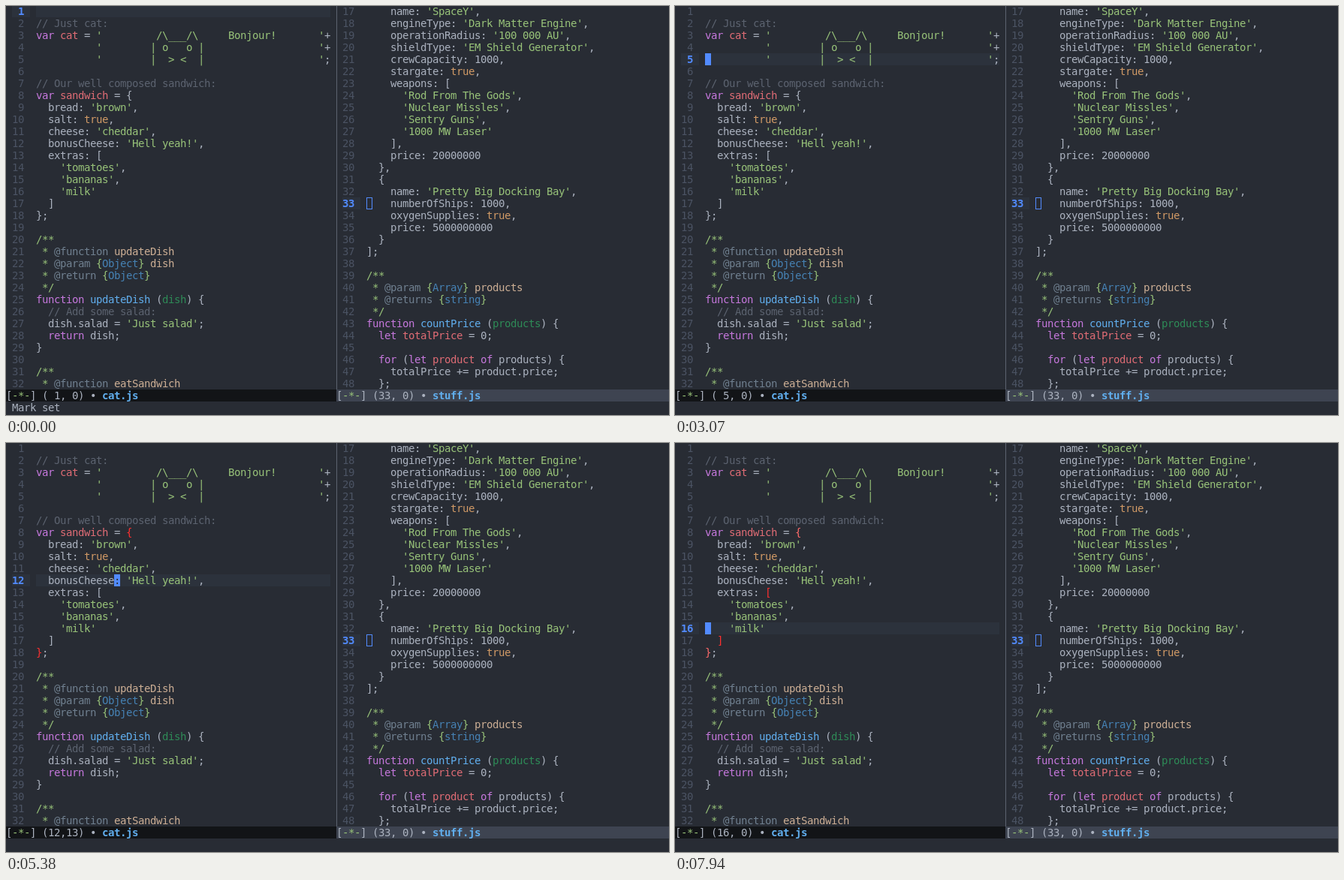
Write an HTML page with a canvas that moves like this. It is 883 px wide and 545 px high and loops after 8 s.

```html
<!DOCTYPE html>
<html lang="en">
<head>
<meta charset="utf-8">
<title>Editor</title>
<style>
  html, body { margin: 0; width: 100%; height: 100%; overflow: hidden; background: #282c34; }
  canvas { display: block; }
</style>
</head>
<body>
<canvas width="883" height="545"></canvas>
<script>
const ctx = document.querySelector('canvas').getContext('2d');
const CELL = 8, ROW = 16, ASCENT = 13, TOP = -1, LOOP = 8000;

const color = {
  bg: '#282c34', text: '#abb2bf', line: '#2c323c', region: '#3e4451', cursor: '#528bff',
  gutter: '#4b5363', border: '#5c6370', active: '#121417', inactive: '#3e4451',
  comment: '#5c6370', string: '#98c379', keyword: '#c678dd', constant: '#d19a66',
  variable: '#e06c75', func: '#61afef', param: '#2e8b57',
  tag: '#708090', type: '#4682b4', value: '#cdaf95',
  inner: '#ff3030', outer: '#ff6a6a'
};

const catCode = String.raw`
// Just cat:
var cat = '         /\___/\     Bonjour!       '+
          '        | o   o |                   '+
          '        |  > <  |                   ';

// Our well composed sandwich:
var sandwich = {
  bread: 'brown',
  salt: true,
  cheese: 'cheddar',
  bonusCheese: 'Hell yeah!',
  extras: [
    'tomatoes',
    'bananas',
    'milk'
  ]
};

/**
 * @function updateDish
 * @param {Object} dish
 * @return {Object}
 */
function updateDish (dish) {
  // Add some salad:
  dish.salad = 'Just salad';
  return dish;
}

/**
 * @function eatSandwich`;

const stuffCode = `    name: 'SpaceY',
    engineType: 'Dark Matter Engine',
    operationRadius: '100 000 AU',
    shieldType: 'EM Shield Generator',
    crewCapacity: 1000,
    stargate: true,
    weapons: [
      'Rod From The Gods',
      'Nuclear Missles',
      'Sentry Guns',
      '1000 MW Laser'
    ],
    price: 20000000
  },
  {
    name: 'Pretty Big Docking Bay',
    numberOfShips: 1000,
    oxygenSupplies: true,
    price: 5000000000
  }
];

/**
 * @param {Array} products
 * @returns {string}
 */
function countPrice (products) {
  let totalPrice = 0;

  for (let product of products) {
    totalPrice += product.price;
  };`;

const rules = new RegExp([
  String.raw`(?<comment>\/\/.*)`,
  String.raw`(?<string>'[^']*')`,
  String.raw`(?<tag>@\w+)`,
  String.raw`(?<type>(?<=\{)\w+(?=\}))`,
  String.raw`(?<value>(?<=@.* )\w+$)`,
  String.raw`(?<keyword>\b(?:var|let|function|for|of|return)\b)`,
  String.raw`(?<constant>\btrue\b)`,
  String.raw`(?<variable>(?<=\b(?:var|let) )\w+)`,
  String.raw`(?<func>(?<=function )\w+)`,
  String.raw`(?<param>(?<=function \w+ \()\w+)`
].join('|'), 'g');

// Each line becomes a list of [character, color] cells.
function highlight(line) {
  const base = /^(\/\*\*| \*)/.test(line) ? color.string : color.text;
  const cells = [...line].map(ch => [ch, base]);
  for (const m of line.matchAll(rules)) {
    const kind = Object.keys(m.groups).find(k => m.groups[k]);
    for (let i = 0; i < m[0].length; i++) cells[m.index + i][1] = color[kind];
  }
  return cells;
}

const parse = code => code.split('\n').map(highlight);
const left = { x: 0, first: 1, name: 'cat.js', lines: parse(catCode) };
const right = { x: 440, first: 17, name: 'stuff.js', lines: parse(stuffCode) };

// Editing commands: time, point, and optional mark column, message or hidden cursor.
const steps = [];
const step = (at, line, col, extra) => steps.push({ at, line, col, ...extra });
const walk = (start, end, from, to) => {
  for (let n = from; n <= to; n++) step(start + (end - start) * (n - from) / (to - from), n, 0);
};
const msg = 'Mark set';

step(0, 1, 0, { msg, hidden: true });
step(500, 1, 0, { msg });
step(980, 1, 0, { msg, hidden: true });
step(1210, 2, 0);
step(1430, 3, 0);
step(1660, 3, 0, { msg });
step(1930, 3, 49, { mark: 0 });
step(2350, 3, 49);
walk(2800, 3740, 3, 10);
step(4130, 10, 2);
step(4400, 10, 2, { msg });
step(4590, 10, 13, { mark: 2 });
step(4790, 10, 13);
step(5210, 11, 13);
step(5380, 12, 13);
step(5530, 13, 11);
step(5620, 13, 0);
step(5890, 12, 0);
step(6130, 12, 2);
step(6450, 12, 2, { msg });
step(6660, 12, 28, { mark: 2 });
step(7080, 12, 28);
walk(7350, 7820, 12, 16);

function rect(x, y, w, h, fill) {
  ctx.fillStyle = fill;
  ctx.fillRect(x, y, w, h);
}

function put(str, x, y, fill, bold) {
  ctx.font = (bold ? 'bold ' : '') + '14px "DejaVu Sans Mono", monospace';
  ctx.fillStyle = fill;
  [...str].forEach((ch, i) => ch !== ' ' && ctx.fillText(ch, x + i * CELL, y + ASCENT));
}

const rowY = (pane, line) => TOP + (line - pane.first) * ROW;

function recolor(line, col, fill) {
  const x = 40 + col * CELL, y = rowY(left, line);
  rect(x, y, CELL, ROW, color.bg);
  put(left.lines[line - 1][col][0], x, y, fill);
}

function drawPane(pane, point) {
  pane.lines.forEach((cells, i) => {
    const n = pane.first + i, y = rowY(pane, n), current = n === point.line;
    if (current) rect(pane.x + 8, y, 24, ROW, color.line);
    put(String(n).padStart(2), pane.x + 8, y, current ? color.cursor : color.gutter, current);
    if (current && pane === left) {
      rect(40, y, 392, ROW, color.line);
      if (point.mark !== undefined)
        rect(40 + point.mark * CELL, y, (point.col - point.mark) * CELL, ROW, color.region);
    }
    cells.forEach(([ch, fill], c) => put(ch, pane.x + 40 + c * CELL, y, fill));
  });
}

function drawCursor({ line, col, hidden }) {
  if (hidden) return;
  const x = 40 + col * CELL, y = rowY(left, line), cell = left.lines[line - 1][col];
  if (x >= 432) return rect(x, y, 7, ROW, color.text);
  rect(x, y, CELL, ROW, color.cursor);
  if (cell) put(cell[0], x, y, color.bg);
}

function drawModeLine(pane, width, fill, { line, col }) {
  const y = 511, pad = n => String(n).padStart(2);
  rect(pane.x, y, width, ROW, fill);
  put(`[   ] (${pad(line)},${pad(col)}) •`, pane.x, y, color.text);
  put('-*-', pane.x + CELL, y, color.string);
  put(pane.name, pane.x + 16 * CELL, y, color.func, true);
}

function draw(t) {
  const point = steps.findLast(s => s.at <= t);
  const idle = { line: 33, col: 0 };
  rect(0, 0, 883, 545, color.bg);
  drawPane(left, point);
  drawPane(right, idle);

  // Enclosing brackets around the point
  const inList = t >= 7940;
  if (t >= 3740) {
    const fill = inList ? color.outer : color.inner;
    recolor(8, 15, fill);
    recolor(18, 0, fill);
  }
  if (inList) {
    recolor(13, 10, color.inner);
    recolor(17, 2, color.inner);
  }

  drawCursor(point);
  ctx.strokeStyle = color.cursor;
  ctx.lineWidth = 1;
  ctx.strokeRect(480.5, rowY(right, 33) + 0.5, CELL - 1, ROW - 1);
  rect(440, 0, 1, 511, color.border);
  drawModeLine(left, 440, color.active, point);
  drawModeLine(right, 443, color.inactive, idle);
  if (point.msg) put(point.msg, 8, 527, color.text);
}

const start = performance.now();
function tick() {
  draw((performance.now() - start) % LOOP);
  requestAnimationFrame(tick);
}
tick();
</script>
</body>
</html>
```
